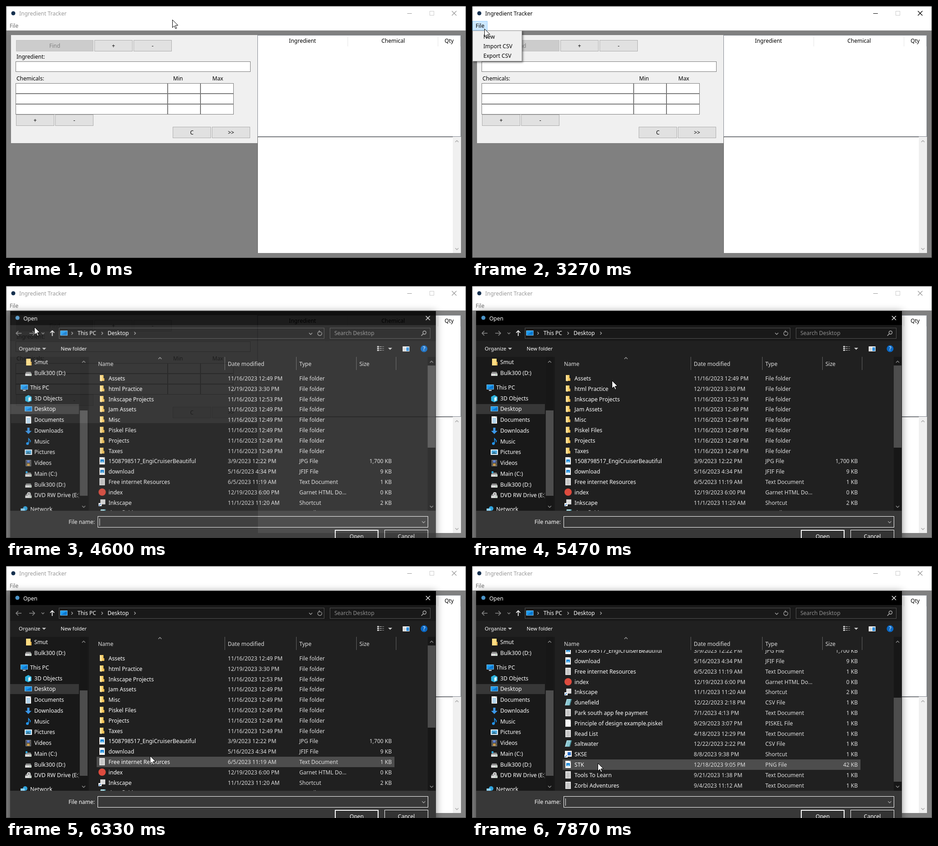
Recreate the animation shown at these times as an HTML page with a canvas. Size 1010x555 px, loop 8000 ms.

```html
<!DOCTYPE html>
<html lang="en">
<head>
<meta charset="utf-8">
<title>Ingredient Tracker</title>
<style>
html, body { margin: 0; width: 100%; height: 100%; overflow: hidden; background: #808080; }
canvas { display: block; }
</style>
</head>
<body>
<canvas id="stage" width="1010" height="555"></canvas>
<script>
const W = 1010, H = 555, LOOP = 8000, STEP = 200 / 3;
const screen = document.getElementById('stage').getContext('2d');
const layer = document.createElement('canvas');
layer.width = W;
layer.height = 600;
const layerCtx = layer.getContext('2d');
let g = screen;

const clamp = v => Math.max(0, Math.min(1, v));

// ---------- drawing helpers ----------
function box(x, y, w, h, fill, line) {
  g.fillStyle = line || fill;
  g.fillRect(x, y, w, h);
  if (line) {
    g.fillStyle = fill;
    g.fillRect(x + 1, y + 1, w - 2, h - 2);
  }
}
function text(s, x, y, color = '#000', align = 'left', size = 12) {
  g.font = size + 'px "Noto Sans", "Open Sans", sans-serif';
  g.textAlign = align;
  g.fillStyle = color;
  g.fillText(s, x, Math.round(y) + 4);
}
function path(points, color, width = 1) {
  g.beginPath();
  for (let i = 0; i < points.length; i += 2) g.lineTo(points[i], points[i + 1]);
  g.strokeStyle = color;
  g.lineWidth = width;
  g.stroke();
}
function poly(points, color) {
  g.beginPath();
  for (let i = 0; i < points.length; i += 2) g.lineTo(points[i], points[i + 1]);
  g.closePath();
  g.fillStyle = color;
  g.fill();
}
function dot(x, y, r, color) {
  g.beginPath();
  g.arc(x, y, r, 0, 7);
  g.fillStyle = color;
  g.fill();
}
function chevron(x, y, color, dir = 1, size = 3.5, width = 1.4) {
  path([x - size, y - dir * size / 2, x, y + dir * size / 2, x + size, y - dir * size / 2], color, width);
}
function chevronRight(x, y, color) {
  path([x - 1.5, y - 3, x + 1.5, y, x - 1.5, y + 3], color, 1.2);
}
function cross(x, y, r, color) {
  path([x - r, y - r, x + r, y + r], color, 1.2);
  path([x + r, y - r, x - r, y + r], color, 1.2);
}
function clipped(x, y, w, h, draw) {
  g.save();
  g.beginPath();
  g.rect(x, y, w, h);
  g.clip();
  draw();
  g.restore();
}

// ---------- pointer path: [step, x, y] ----------
const TRACK = [
  [0, 365, 30], [8, 365, 30], [11, 365, 35], [24, 365, 35], [30, 38, 267], [32, 3, 299],
  [37, 106, 115], [43, 24, 52], [47, 24, 46], [48, 24, 46], [49, 27, 50], [60, 62, 90],
  [74, 62, 90], [75, 60, 84], [78, 140, 118], [82, 307, 208], [87, 336, 420], [90, 330, 462],
  [95, 316, 418], [99, 346, 395], [101, 354, 391], [108, 354, 391], [118, 276, 434], [120, 276, 434]
];
function pointer(k) {
  let i = 1;
  while (i < TRACK.length - 1 && TRACK[i][0] < k) i++;
  const a = TRACK[i - 1], b = TRACK[i];
  const p = clamp((k - a[0]) / (b[0] - a[0]));
  return { x: Math.round(a[1] + (b[1] - a[1]) * p), y: Math.round(a[2] + (b[2] - a[2]) * p) };
}
function drawPointer(k) {
  const p = pointer(k);
  g.save();
  g.translate(p.x + 0.5, p.y + 0.5);
  const arrow = [0, 0, 0, 17, 4, 13.3, 6.8, 19.5, 9.2, 18.5, 6.5, 12.3, 12, 12, 0, 0];
  poly(arrow, '#fff');
  path(arrow, '#000');
  g.restore();
}

// ---------- main window ----------
function button(label, x, y, w, off) {
  box(x, y, w, 25, off ? '#cccccc' : '#e1e1e1', off ? '#bfbfbf' : '#adadad');
  text(label, x + w / 2, y + 13, off ? '#838383' : '#000', 'center');
}
function drawMain(active) {
  const ink = active ? '#000' : '#999';
  box(0, 0, W, H, '#808080', active ? '#1c1c1c' : '#464646');
  box(1, 1, W - 2, 53, '#fff');
  box(1, 53, W - 2, 1, '#f0f0f0');
  dot(16, 16, 4.5, '#16304f');
  text('Ingredient Tracker', 29, 17, ink);
  box(881, 16, 10, 1, ink);
  box(930, 11, 10, 10, '#fff', '#ccc');
  cross(984, 16, 5, ink);
  text('File', 8, 44, active ? '#000' : '#6d6d6d');

  box(11, 64, 541, 238, '#f0f0f0');
  button('Find', 22, 75, 170, true);
  button('+', 194, 75, 84);
  button('-', 280, 75, 84);
  text('Ingredient:', 23, 112);
  box(21, 122, 516, 23, '#fff', '#7a7a7a');
  text('Chemicals:', 23, 160);
  text('Min', 367, 160);
  text('Max', 453, 160);
  for (let y = 170; y < 230; y += 23) {
    box(21, y, 334, 23, '#fff', '#7a7a7a');
    box(355, y, 72, 23, '#fff', '#7a7a7a');
    box(427, y, 73, 23, '#fff', '#7a7a7a');
  }
  button('+', 22, 239, 84);
  button('-', 108, 239, 84);
  button('C', 366, 266, 84);
  button('>>', 452, 266, 84);

  box(552, 64, 447, 224, '#fff', '#828790');
  for (const x of [750, 948, 997]) box(x, 66, 1, 23, '#e5e5e5');
  text('Ingredient', 651, 77, '#000', 'center');
  text('Chemical', 850, 77, '#000', 'center');
  text('Qty', 973, 77, '#000', 'center');
  box(552, 288, 429, 256, '#fff');
  box(552, 288, 429, 1, '#696969');
  box(552, 288, 1, 256, '#696969');
  box(981, 288, 18, 256, '#f0f0f0');
  chevron(990, 298, '#a8a8a8', -1);
  chevron(990, 535, '#a8a8a8');
}
function drawMenu(k) {
  const p = pointer(k);
  const open = k >= 44 && k < 62;
  const over = p.x < 34 && p.y > 32 && p.y < 54;
  if (open || (over && k < 62)) {
    box(1, 33, 33, 21, open ? '#cce8ff' : '#e5f3ff', open ? '#99d1ff' : '#cce8ff');
    text('File', 8, 44);
  }
  if (k < 44 || k > 62) return;
  g.save();
  g.globalAlpha = k === 62 ? 0.4 : clamp((k - 43) / 4);
  g.shadowColor = 'rgba(0,0,0,.5)';
  g.shadowBlur = 4;
  g.shadowOffsetX = g.shadowOffsetY = 2;
  box(1, 54, 109, 68, '#a0a0a0');
  g.shadowColor = 'transparent';
  box(2, 55, 107, 66, '#f0f0f0');
  ['New', 'Import CSV', 'Export CSV'].forEach((label, i) => {
    const y = 57 + 21 * i;
    if (p.y >= y && p.y < y + 21) box(4, y, 103, 21, '#91c9f7');
    text(label, 25, y + 11);
  });
  g.restore();
}

// ---------- file dialog ----------
const FOLDERS = ['Assets', 'html Practice', 'Inkscape Projects', 'Jam Assets', 'Misc', 'Piskel Files', 'Projects', 'Taxes'];
const FOLDER_TIMES = { 1: '12/19/2023 3:30 PM', 2: '11/16/2023 12:53 PM' };
const ROWS = FOLDERS.map((name, i) =>
  [name, FOLDER_TIMES[i] || '11/16/2023 12:49 PM', 'File folder', '', 'folder']).concat([
  ['1508798517_EngiCruiserBeautiful', '3/9/2023 12:22 PM', 'JPG File', '1,700 KB', 'image'],
  ['download', '5/16/2023 4:34 PM', 'JFIF File', '9 KB', 'image'],
  ['Free internet Resources', '6/5/2023 11:19 AM', 'Text Document', '1 KB', 'note'],
  ['index', '12/19/2023 6:00 PM', 'Garnet HTML Do...', '0 KB', 'web'],
  ['Inkscape', '11/1/2023 11:20 AM', 'Shortcut', '2 KB', 'app'],
  ['dunefield', '12/22/2023 2:18 PM', 'CSV File', '1 KB', 'sheet'],
  ['Park south app fee payment', '7/1/2023 4:13 PM', 'Text Document', '1 KB', 'note'],
  ['Principle of design example.piskel', '9/29/2023 3:07 PM', 'PISKEL File', '1 KB', 'page'],
  ['Read List', '4/18/2023 12:29 PM', 'Text Document', '1 KB', 'note'],
  ['saltwater', '12/22/2023 2:22 PM', 'CSV File', '1 KB', 'sheet'],
  ['SKSE', '8/8/2023 9:38 PM', 'Shortcut', '1 KB', 'link'],
  ['STK', '12/18/2023 9:05 PM', 'PNG File', '42 KB', 'image'],
  ['Tools To Learn', '9/21/2023 1:38 PM', 'Text Document', '1 KB', 'note'],
  ['Zorbi Adventures', '9/4/2023 11:12 AM', 'Text Document', '1 KB', 'note']
]);
const PITCH = 22.8, MAX_SCROLL = 199.2, LIST_SIZE = 12.15;

function shortcutArrow(x, y) {
  box(x - 8, y + 1, 7, 7, '#fff');
  path([x - 7, y + 7, x - 3, y + 3], '#1565c0', 1.4);
}
function monitor(x, y) {
  box(x - 8, y - 6, 16, 11, '#1d9bf0', '#79c7f7');
  poly([x - 7, y + 4, x + 7, y - 5, x + 7, y + 4], '#0b78d0');
}
const ICONS = {
  folder(x, y) {
    box(x - 5, y - 7, 8, 13, '#f5c963');
    poly([x - 5, y - 7, x - 1, y - 5, x - 1, y + 7, x - 5, y + 6], '#ffe39a');
    box(x + 3, y, 2, 6, '#e0ae45');
  },
  page(x, y) {
    box(x - 6, y - 8, 12, 16, '#f7f7f7');
    poly([x + 2, y - 8, x + 6, y - 8, x + 6, y - 4], '#bcbcbc');
  },
  note(x, y) {
    box(x - 6, y - 8, 12, 16, '#e4e4e4');
    for (let i = -5; i < 7; i += 2) box(x - 4, y + i, 8, 1, '#a9a9a9');
  },
  image(x, y) {
    ICONS.page(x, y);
    box(x - 4, y - 3, 8, 7, '#1e88d8');
    poly([x - 4, y + 4, x, y, x + 4, y + 4], '#8fd0f5');
  },
  sheet(x, y) {
    poly([x - 3, y - 7, x + 8, y - 7, x + 4, y + 7, x - 7, y + 7], '#a8dbe4');
    poly([x + 6, y - 7, x + 8, y - 7, x + 4, y + 7, x + 2, y + 7], '#3f8996');
    for (let i = -4; i < 6; i += 3) box(x - 3 - i / 4, y + i, 6, 1, '#4e9aa8');
  },
  web(x, y) { dot(x, y, 8, '#dd4b3e'); },
  app(x, y) { box(x - 4, y - 7, 11, 11, '#dadada'); shortcutArrow(x, y); },
  link(x, y) {
    box(x - 7, y - 7, 15, 13, '#f2f2f2');
    box(x - 1, y - 4, 7, 7, '#2a6fc9');
    shortcutArrow(x, y);
  },
  bigFolder(x, y) { box(x - 5, y - 8, 10, 15, '#ffdc82'); box(x + 4, y - 1, 3, 8, '#e6b653'); },
  drive(x, y) {
    poly([x - 5, y - 3, x + 5, y - 3, x + 7, y + 1, x - 7, y + 1], '#8b8b8b');
    box(x - 7, y + 1, 14, 5, '#dcdcdc');
    box(x + 3, y + 3, 2, 1, '#3cb54a');
  },
  disk(x, y) { ICONS.drive(x, y); box(x - 6, y - 6, 4, 4, '#28a8e8'); },
  disc(x, y) { ICONS.drive(x, y); dot(x + 1, y - 3, 4, '#d0d0d0'); dot(x + 1, y - 3, 1.2, '#444'); },
  pc(x, y) { monitor(x, y - 1); box(x - 3, y + 5, 6, 2, '#c8d8e4'); },
  cube(x, y) {
    poly([x - 7, y - 4, x, y - 8, x + 7, y - 4, x + 7, y + 5, x, y + 8, x - 7, y + 5], '#2ab0dd');
    poly([x, y - 2, x + 5, y - 4, x + 5, y + 4, x, y + 6], '#d9f3fb');
  },
  desktop: monitor,
  document(x, y) {
    ICONS.page(x, y);
    for (let i = -4; i < 6; i += 3) box(x - 4, y + i, 8, 1, '#2b8fd6');
  },
  download(x, y) {
    poly([x - 2.5, y - 7, x + 2.5, y - 7, x + 2.5, y, x + 7, y, x, y + 7, x - 7, y, x - 2.5, y], '#3b97e8');
  },
  music(x, y) {
    dot(x - 2, y + 4, 3, '#2196f3');
    path([x + 0.5, y + 4, x + 0.5, y - 7, x + 4.5, y - 2, x + 4, y + 1], '#2196f3', 1.6);
  },
  picture(x, y) {
    box(x - 8, y - 6, 16, 12, '#e8f3fa');
    box(x - 6, y - 4, 12, 8, '#4aa8dd');
    poly([x - 6, y + 4, x - 1, y - 1, x + 6, y + 4], '#2f6f8f');
  },
  video(x, y) {
    box(x - 6, y - 7, 12, 14, '#4a4a4a', '#8a8a8a');
    box(x - 3, y - 6, 6, 5, '#5d7fd0');
    box(x - 3, y + 1, 6, 5, '#c79a4a');
  },
  network(x, y) { dot(x + 2, y - 2, 5, '#2fa3dc'); box(x - 8, y - 2, 9, 6, '#8fd0f0'); }
};

const PLACES = [
  ['3D Objects', 'cube'], ['Desktop', 'desktop'], ['Documents', 'document'], ['Downloads', 'download'],
  ['Music', 'music'], ['Pictures', 'picture'], ['Videos', 'video'], ['Main (C:)', 'disk'],
  ['Bulk300 (D:)', 'drive'], ['DVD RW Drive (E:)', 'disc']
];

function drawPlaces() {
  box(9, 156, 173, 339, '#191919');
  box(9, 260, 151, 22, '#373737');
  clipped(9, 156, 151, 339, () => {
    const item = (label, icon, x, y) => {
      ICONS[icon](x - 13, y);
      text(label, x, y, '#fff', 'left', LIST_SIZE);
    };
    item('Smut', 'bigFolder', 62, 168);
    item('Bulk300 (D:)', 'drive', 62, 192);
    item('This PC', 'pc', 53, 224);
    PLACES.forEach(([label, icon], i) => item(label, icon, 62, Math.round(247.6 + 23.75 * i)));
    item('Network', 'network', 53, 492);
  });
  box(162, 156, 17, 339, '#171717');
  box(162, 274, 17, 188, '#4d4d4d');
  chevron(170.5, 167, '#8a8a8a', -1);
  chevron(170.5, 486, '#8a8a8a');
}
function drawList(k) {
  const scroll = Math.min(MAX_SCROLL, Math.max(0, k - 103) * 3 * PITCH);
  const part = scroll / MAX_SCROLL;
  const top = 192.6 - scroll;
  const p = pointer(k - 1);   // hover trails the pointer by one step
  const inside = p.x > 199 && p.x < 853 && p.y > 185 && p.y < 495;
  const hover = inside ? Math.floor((p.y - top) / PITCH) : -1;
  box(182, 156, 762, 339, '#202020');
  clipped(182, 185, 744, 310, () => {
    ROWS.forEach(([name, date, type, size, icon], i) => {
      const y = Math.round(top + PITCH * (i + 0.5));
      if (y < 165 || y > 510) return;
      if (i === hover) box(199, y - 12, 654, 23, '#4d4d4d');
      ICONS[icon](211, y - 1);
      text(name, 225, y, '#fff', 'left', LIST_SIZE);
      text(date, 487, y, '#dedede', 'left', LIST_SIZE);
      text(type, 644, y, '#dedede');
      text(size, 847, y, '#dedede', 'right');
    });
  });
  [['Name', 202], ['Date modified', 487], ['Type', 644], ['Size', 776]].forEach(([s, x]) => text(s, x, 172, '#dedede'));
  for (const x of [480, 637, 769, 856]) box(x, 156, 1, 29, '#636363');
  chevron(338, 159, '#9a9a9a', -1);
  box(926, 156, 17, 339, '#171717');
  box(926, Math.round(175 + 115 * part), 17, Math.round(181 + 4 * part), '#4d4d4d');
  chevron(934.5, 167, '#8a8a8a', -1);
  chevron(934.5, 486, '#8a8a8a');
}
function drawTools() {
  box(9, 86, 935, 35, '#191919');
  box(9, 121, 935, 35, '#202020');
  path([27, 104, 22, 104, 34, 104], '#8a8a8a', 1.5);
  path([27, 99, 22, 104, 27, 109], '#8a8a8a', 1.5);
  path([51, 104, 63, 104], '#8a8a8a', 1.5);
  path([58, 99, 63, 104, 58, 109], '#8a8a8a', 1.5);
  chevron(81, 104, '#8a8a8a', 1, 3);
  path([101.5, 110, 101.5, 99], '#fff', 1.7);
  path([97, 103, 101.5, 98.5, 106, 103], '#fff', 1.7);
  box(116, 92, 583, 24, '#191919', '#535353');
  monitor(127, 104);
  chevronRight(145, 104, '#b0b0b0');
  text('This PC', 157, 104, '#fff');
  chevronRight(211, 104, '#b0b0b0');
  text('Desktop', 223, 104, '#fff');
  chevronRight(283, 104, '#b0b0b0');
  chevron(669, 105, '#a0a0a0');
  g.beginPath();
  g.arc(689, 104.5, 4.5, -0.6, 4.4);
  g.strokeStyle = '#a0a0a0';
  g.lineWidth = 1.4;
  g.stroke();
  path([688, 97.5, 688, 101, 692, 101], '#a0a0a0', 1.4);
  box(711, 92, 221, 24, '#191919', '#535353');
  text('Search Desktop', 721, 104, '#8e8e8e');
  g.beginPath();
  g.arc(919, 102.5, 3.5, 0, 7);
  g.strokeStyle = '#b0b0b0';
  g.stroke();
  path([916.5, 105, 912, 109.5], '#b0b0b0', 1.6);

  text('Organize', 28, 138, '#fff', 'left', 11.1);
  poly([79, 136, 88, 136, 83.5, 140.5], '#c0c0c0');
  text('New folder', 120, 138, '#fff', 'left', 11.1);
  for (let y = 132; y < 144; y += 4) {
    box(815, y, 4, 3, '#c8c8c8');
    box(820, y + 1, 5, 1, '#c8c8c8');
    box(826, y + 1, 4, 1, '#8a8a8a');
  }
  poly([839, 136, 848, 136, 843.5, 140.5], '#c8c8c8');
  box(871, 133, 15, 11, '#fff');
  box(872, 135, 6, 8, '#d8d8d8');
  box(879, 135, 6, 8, '#2f8fdd');
  dot(918, 138, 7.5, '#0a68c4');
  text('?', 918, 138, '#fff', 'center');
}
function drawDialog(k) {
  const loaded = k >= 69;
  box(9, 55, 935, 525, '#383838');
  box(9, 55, 935, loaded ? 31 : 33, '#000');
  dot(25, 70, 4.5, '#4b94c8');
  text('Open', 38, 72, '#fff');
  cross(926.5, 70.5, 4.5, '#fff');
  if (!loaded) {
    box(9, 88, 935, 407, '#fff');
    box(924, 175, 20, 181, '#535353');
    box(924, 356, 20, 119, '#1d1d1d');
    box(137, 510, 58, 17, '#fff');
    box(200, 506, 726, 26, '#fff');
    box(720, 536, 97, 26, '#fff');
    box(830, 536, 96, 26, '#fff');
    box(926, 557, 18, 18, '#fff');
    return;
  }
  drawTools();
  drawPlaces();
  drawList(k);
  text('File name:', 195, 520, '#fff', 'right');
  box(201, 507, 726, 25, '#383838', '#fff');
  chevron(917, 520, '#a0a0a0');
  if (((k - 69) >> 3) % 2 === 0) box(205, 512, 1, 16, '#fff');
  box(722, 537, 96, 26, '#fff');
  box(724, 539, 92, 22, '#333');
  text('Open', 770, 552, '#fff', 'center');
  box(831, 537, 96, 26, '#333', '#fff');
  text('Cancel', 879, 552, '#fff', 'center');
}
function showDialog(k) {
  const p = clamp((k * STEP - 4370) / 260);
  if (!p) return;
  g = layerCtx;
  g.clearRect(0, 0, W, 600);
  drawDialog(k);
  g = screen;
  const scale = 1 - 0.1 * Math.pow(1 - p, 2.48);
  g.save();
  g.globalAlpha = p;
  g.translate(476.5, 294);
  g.scale(scale, scale);
  g.translate(-476.5, -294);
  g.save();
  g.beginPath();
  g.rect(-200, -200, W + 400, H + 400);
  g.rect(9, 55, 935, 525);
  g.clip('evenodd');
  g.shadowColor = 'rgba(0,0,0,.45)';
  g.shadowBlur = 16;
  g.shadowOffsetY = 2;
  box(9, 55, 935, 525, '#000');
  g.restore();
  g.drawImage(layer, 0, 0);
  g.restore();
}

function render(now) {
  const k = Math.floor(((now % LOOP) + 4) / STEP) % 120;
  drawMain(k >= 22 && k < 65);
  drawMenu(k);
  showDialog(k);
  drawPointer(k);
}
const start = performance.now();
function tick() {
  render(performance.now() - start);
  requestAnimationFrame(tick);
}
tick();
</script>
</body>
</html>
```
